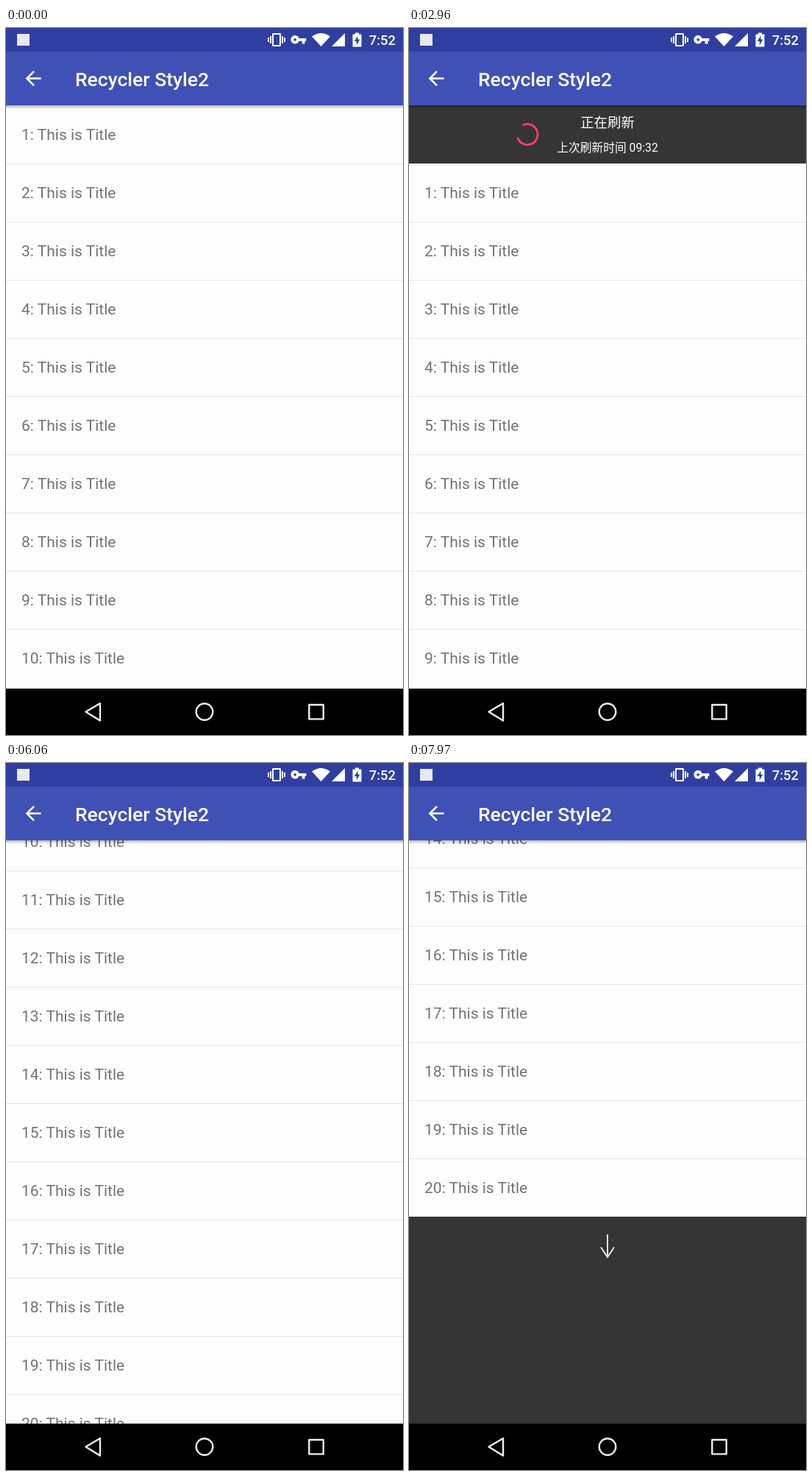
Write an HTML page that moves like this. It is 540 px wide and 960 px high and loops after 7.99 s.

```html
<!DOCTYPE html>
<html lang="zh-CN">
<head>
<meta charset="utf-8">
<title>Recycler list</title>
<style>
  html, body { margin: 0; width: 100%; height: 100%; overflow: hidden; background: #000; }
  #stage { position: relative; width: 540px; height: 960px; overflow: hidden; font-family: Roboto, sans-serif; }
  #stage div, #stage svg { position: absolute; }
  #view { left: 0; top: 105px; width: 540px; height: 792px; overflow: hidden; background: #353535; }
  #body { left: 0; top: 0; width: 540px; height: 1580px; will-change: transform; }
  #list { left: 0; top: 0; width: 540px; height: 1580px; background: #fdfdfd; }
  .row { left: 0; width: 540px; height: 79px; box-sizing: border-box; padding: 1px 0 0 21px; font-size: 21px; line-height: 79px; color: #737373; white-space: pre; }
  .row + .row { box-shadow: inset 0 1px #e6e6e8; }
  .pane { left: 0; width: 540px; height: 79px; color: #fff; text-align: center; font-family: Roboto, "Noto Sans CJK SC", "Noto Sans CJK", sans-serif; }
  #head { top: -79px; }
  #foot { top: 1580px; }
  .pane div { left: 0; width: 540px; white-space: pre; }
  #state { top: 10px; font-size: 18.4px; line-height: 28px; }
  #last { top: 46px; font-size: 15.75px; line-height: 24px; }
  svg { left: 0; top: 0; overflow: visible; }
  #shade { left: 0; top: 105px; width: 540px; height: 5px; background: linear-gradient(rgba(0, 0, 0, .28), rgba(0, 0, 0, 0)); }
  #status { left: 0; top: 0; width: 540px; height: 32px; background: #303f9f; }
  #bar { left: 0; top: 32px; width: 540px; height: 73px; background: #3f51b5; }
  #title { left: 94px; top: 33px; font-size: 26.5px; font-weight: 500; line-height: 73px; color: #fff; white-space: pre; }
  #clock { right: 10px; top: 1px; font-size: 18.4px; font-weight: 500; line-height: 32px; color: #fff; }
  #nav { left: 0; top: 897px; width: 540px; height: 63px; background: #000; }
</style>
</head>
<body>
<div id="stage">
  <div id="view">
    <div id="body">
      <div id="list"></div>
      <div id="head" class="pane">
        <svg width="540" height="79" fill="none">
          <path id="headArrow" d="M0 -15.5V15.5M-9 2L0 15.5L9 2" stroke="#eee" stroke-width="1.9"/>
          <path id="ring" stroke="#ff4068" stroke-width="2.8"/>
        </svg>
        <div id="state"></div>
        <div id="last">上次刷新时间 09:32</div>
      </div>
      <div id="foot" class="pane">
        <svg width="540" height="79" fill="none">
          <path id="footArrow" d="M0 -15.5V15.5M-9 2L0 15.5L9 2" stroke="#eee" stroke-width="1.9"/>
        </svg>
      </div>
    </div>
    <svg width="540" height="792"><ellipse id="glow" cx="270" rx="810" fill="#4b4b64"/></svg>
  </div>
  <div id="shade"></div>
  <div id="status"></div>
  <div id="bar"></div>
  <div id="title">Recycler Style2</div>
  <div id="clock">7:52</div>
  <div id="nav"></div>
  <svg width="540" height="960" fill="#fff">
    <rect x="15" y="8" width="17" height="16" fill="#e8e8ee"/>
    <path transform="translate(356 4)" d="M0 15h2V9H0zM3 17h2V7H3zM22 9v6h2V9zM19 17h2V7h-2zM16.5 3h-9C6.67 3 6 3.67 6 4.5v15c0 .83.67 1.5 1.5 1.5h9c.83 0 1.5-.67 1.5-1.5v-15c0-.83-.67-1.5-1.5-1.5zM16 19H8V5h8z"/>
    <path transform="translate(386.5 4.4) scale(.95)" d="M12.65 10C11.83 7.67 9.61 6 7 6c-3.31 0-6 2.69-6 6s2.69 6 6 6c2.61 0 4.83-1.67 5.65-4H17v4h4v-4h2v-4zM7 14c-1.1 0-2-.9-2-2s.9-2 2-2 2 .9 2 2-.9 2-2 2z"/>
    <path d="M416 11.5Q428.5 2.5 441 11.5L428.5 25ZM461 7V25H443Z"/>
    <path fill-rule="evenodd" d="M471.5 8.5H475V6.5H480V8.5H483.5V25.5H471.5ZM478.5 10.5L473.7 18H476.8V23.5L481.3 15.5H478.5Z"/>
    <path transform="translate(21.3 52.75) scale(1.3125)" d="M20 11H7.83l5.59-5.59L12 4l-8 8 8 8 1.41-1.41L7.83 13H20z"/>
    <g fill="none" stroke="#eee" stroke-width="2.4" stroke-linejoin="round">
      <path d="M108.5 928.5L128 917V940.5Z"/>
      <circle cx="270" cy="928.5" r="11.3"/>
      <rect x="412.3" y="919" width="19.4" height="19.4"/>
    </g>
  </svg>
</div>
<script>
  const $ = id => document.getElementById(id);
  const LOOP = 7990, PANE = 79, ROWS = 20;

  for (let i = 0; i < ROWS; i++) {
    const row = document.createElement('div');
    row.className = 'row';
    row.style.top = i * PANE + 'px';
    row.textContent = `${i + 1}: This is Title`;
    $('list').append(row);
  }

  const clamp = x => Math.min(1, Math.max(0, x));
  const linear = x => x;
  const out = x => 1 - (1 - x) ** 2;
  const settle = x => 1 - (1 - x) ** 3;
  const inOut = x => x * x * (3 - 2 * x);
  const span = (t, from, to) => clamp((t - from) / (to - from));

  // [time, offset, easing towards this key]; negative pulls the header out
  const scroll = [
    [200, 0], [600, -165, inOut], [620, -165], [1020, -PANE, settle],
    [3670, -PANE], [4070, 0, settle], [4830, 0], [5000, 788, x => x ** 1.4],
    [5960, 788], [6060, 749], [6140, 735, out], [6740, 924],
    [7000, 939], [7550, 979], [7970, 1069]
  ];

  function at(keys, t) {
    const n = keys.findIndex(k => k[0] > t);
    if (n === 0) return keys[0][1];
    if (n < 0) return keys[keys.length - 1][1];
    const [t0, a] = keys[n - 1], [t1, b, ease = linear] = keys[n];
    return a + (b - a) * ease((t - t0) / (t1 - t0));
  }

  // Trim curve: cubic with x handles .4 and .2, solved by bisection
  function trim(x) {
    let lo = 0, hi = 1;
    for (let i = 0; i < 18; i++) {
      const s = (lo + hi) / 2, r = 1 - s;
      if (1.2 * r * r * s + .6 * r * s * s + s ** 3 < x) lo = s; else hi = s;
    }
    return inOut(lo);
  }

  function drawRing(u) {
    const phase = u % 1333 / 1333;
    const tail = 281 * (1 - trim(clamp(2 - 2 * phase)));
    const tip = 281 * trim(clamp(2 * phase));
    const base = -103 + 79 * phase + Math.floor(u / 1333) * 360 + .16 * u;
    const point = deg => {
      const a = deg * Math.PI / 180;
      return `${161 + 14 * Math.cos(a)} ${39.5 + 14 * Math.sin(a)}`;
    };
    const sweep = Math.max(1, tip - tail);
    $('ring').setAttribute('d',
      `M${point(base + tail)}A14 14 0 ${sweep > 180 ? 1 : 0} 1 ${point(base + tail + sweep)}`);
  }

  function drawGlow(t) {
    const grow = out(span(t, 4990, 5210)), fade = 1 - out(span(t, 5210, 5820));
    const size = .85 * grow * fade;
    $('glow').setAttribute('ry', 810 * size);
    $('glow').setAttribute('cy', 792 + 701.5 * size);
    $('glow').setAttribute('opacity', .5 * grow * fade);
  }

  const place = (id, x, turn) =>
    $(id).setAttribute('transform', `translate(${x} 39.5) rotate(${turn})`);

  function draw(t) {
    $('body').style.transform = `translateY(${-Math.round(at(scroll, t))}px)`;
    const busy = t >= 1020 && t < 4070;
    $('state').textContent = busy ? '正在刷新' : t >= 400 && t < 1020 ? '松开刷新' : '下拉刷新';
    $('ring').style.display = busy ? '' : 'none';
    $('headArrow').style.display = busy ? 'none' : '';
    place('headArrow', 161, -180 * span(t, 400, 580));
    place('footArrow', 270, 180 - 180 * span(t, 6560, 6740));
    if (busy) drawRing(t - 1020);
    drawGlow(t);
  }

  const start = performance.now();
  function tick() {
    draw((performance.now() - start) % LOOP);
    requestAnimationFrame(tick);
  }
  tick();
</script>
</body>
</html>
```
